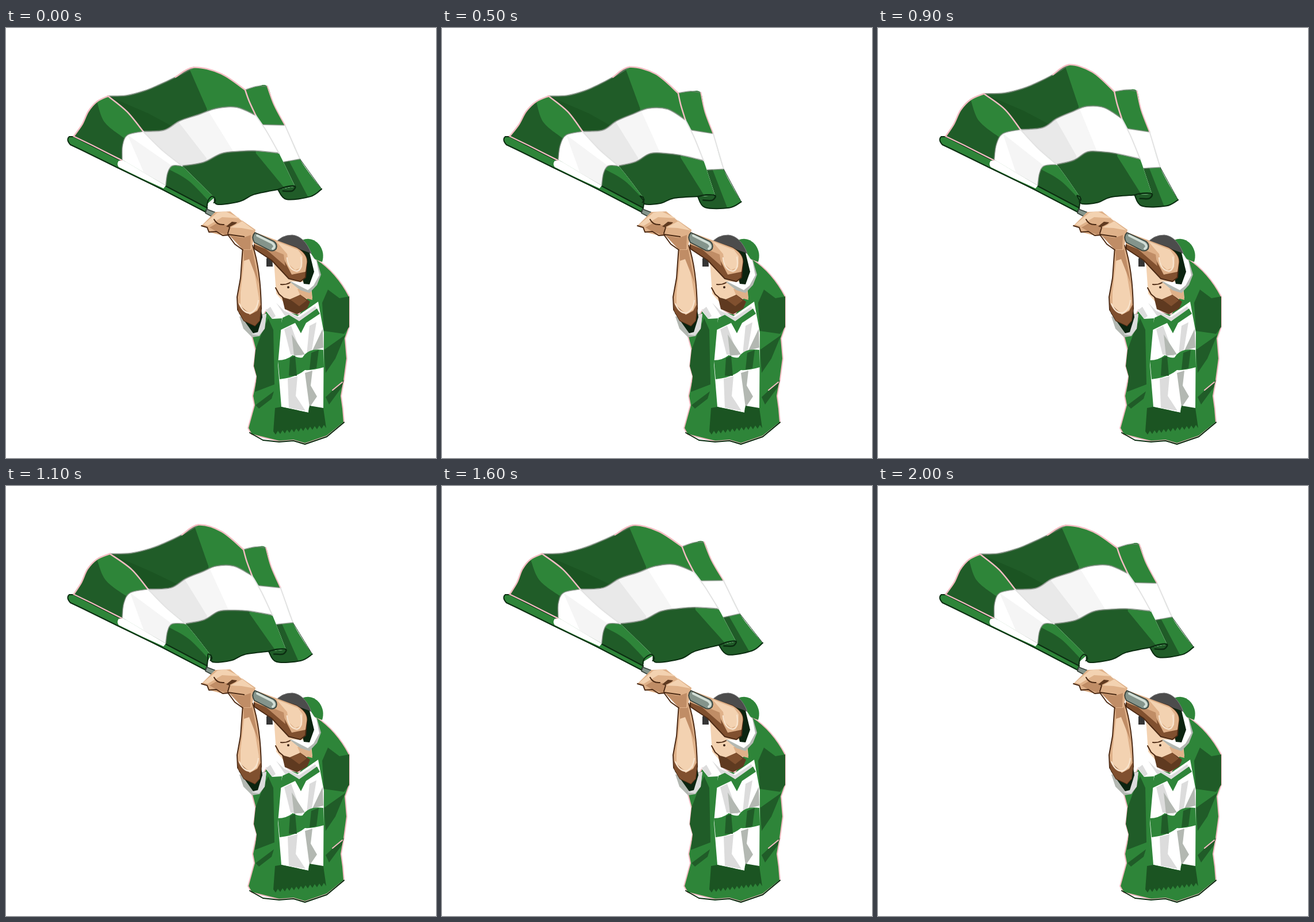
Animation of 748 by 748 pixels, one loop 2.1 s. Source, as an HTML page with a canvas:

```html
<!DOCTYPE html>
<html lang="en">
<head>
<meta charset="utf-8">
<title>Flag waver</title>
<style>
  html, body { margin: 0; width: 100%; height: 100%; overflow: hidden; background: #fff; }
  canvas, svg { position: absolute; left: 0; top: 0; width: 748px; height: 748px; display: block; }
  path { stroke-linecap: round; stroke-linejoin: round; }
  .green { fill: #2e8539; }
  .dark { fill: #205c28; }
  .deep { fill: #1b5422; }
  .ink { fill: #0b2410; }
  .white { fill: #fff; }
  .pale { fill: #dcdcdc; }
  .grey { fill: #b3b8b2; }
  .skin { fill: #dfb189; }
  .light { fill: #f3d2b1; }
  .tan { fill: #c08d66; }
  .brown { fill: #80502f; }
  .bark { fill: #5f3a20; }
  .metal { fill: #84948b; stroke: #39443d; stroke-width: 1.8; }
  .line { fill: none; }
  .pink { stroke: #f3bcc2; stroke-width: 2; }
  .edge { stroke: #4c2a14; stroke-width: 2; }
  .rim { stroke: #0b2d11; stroke-width: 2; }
  .glow { stroke: #f8e3cc; stroke-width: 2.5; }
</style>
</head>
<body>
<canvas id="flag" width="748" height="748"></canvas>
<svg viewBox="0 0 748 748">
  <!-- pole sleeve -->
  <path class="green rim" d="M118 189L201 231 278 275 350 313 347 320 272 281 194 243 131 212 112 203Q104 194 110 189Z"/>
  <path class="white" d="M196 231L203 230 278 274 274 279 235 261 196 242Q192 237 196 231Z"/>
  <path class="line pink" d="M117 188L150 204 201 230"/>

  <!-- shirt -->
  <path class="green pink" d="M428 537L434 560 431 588 436 606 429 640 432 656 421 696 427 707 475 719 500 717 520 723 558 710 588 686 586 662 583 640 588 612 593 575 590 540 597 520 597 467Q575 425 540 402L528 460 510 498 476 490 453 490Z"/>
  <path class="dark" d="M445 530L456 505 465 525 467 620 433 633 436 606 431 588 434 560ZM550 478L560 455 580 470 597 467 597 520 588 532 553 527ZM553 560L590 534 573 575 556 600ZM556 642L588 612 584 625 562 655ZM434 656L466 632 462 645 440 662Z"/>
  <path class="line pink" d="M568 630L585 616"/>
  <path class="line rim" d="M424 704L447 717 475 720 500 718 520 724 558 711 588 686"/>

  <!-- scarf -->
  <path class="white" d="M451 491L475 474 484 490 507 501 543 476 553 530 552 662 527 660 526 669 479 659 473 585 480 505 463 506Z"/>
  <path class="pale" d="M452 491L460 485 469 501 463 506ZM470 478L484 492 510 503 538 484 541 491 512 510 486 502Z"/>
  <path class="green" d="M481 504L492 499 510 510 541 488 546 497 522 513 513 531 503 513 476 526Z"/>
  <path class="pale" d="M484 524L496 518 515 570 495 568ZM528 518L540 512 532 560 523 568ZM490 610L507 606 504 640 521 666 492 661Z"/>
  <path class="grey" d="M497 533L520 568 501 570ZM551 523L552 556 533 561ZM520 600L533 596 530 622 541 641 528 660Z"/>
  <path class="green" d="M473 578Q488 578 499 569 508 575 516 573 526 556 552 560L553 590Q533 596 520 595 505 608 476 611Z"/>
  <path class="dark" d="M494 574L503 570 506 605 492 605ZM531 565L544 560 540 592 528 594Z"/>
  <path id="fringe" class="deep"/>

  <!-- head -->
  <path class="green" d="M515 369Q532 362 545 377 555 391 550 407L537 402Z"/>
  <path class="light" d="M466 405L500 410 530 440 533 470 482 476 470 462Z"/>
  <path class="skin" d="M507 454L530 450 533 473 513 468Z"/>
  <path class="bark" d="M480 468L494 472 512 464 529 476 524 488 506 498 485 489Z"/>
  <path class="brown" d="M494 472L512 464 523 474 510 484Z"/>
  <path class="line edge" d="M478 446Q487 447 494 443M469 452L475 463 482 469"/>
  <circle cx="491" cy="451" r="2" fill="#3b2413"/>
  <path fill="#353535" d="M453 401L463 392 464 415 453 415Z"/>
  <path fill="#4c4c4c" stroke="#7d7d7d" d="M467 376Q478 360 498 360 519 362 531 392L505 388Z"/>

  <!-- raised arm -->
  <path class="grey" d="M526 392L541 405 548 429 541 447 528 461 512 456 493 441 522 442Z"/>
  <path class="white" d="M526 392L540 405 545 430 535 448 525 456 496 441 522 442Z"/>
  <path class="ink" d="M503 382L528 391 536 424 528 446 518 445Z"/>
  <path class="brown edge" d="M432 356L470 371 505 382Q526 394 523 410L521 434 512 441 492 436 462 404 432 384Z"/>
  <path class="skin" d="M432 355L470 369 505 382Q526 394 523 410L521 424 497 429 480 396 431 376Z"/>
  <path class="tan" d="M444 378L483 394 486 414 456 388Z"/>
  <path class="light" d="M470 371L508 386 516 397 515 416 503 421 492 411 489 393Z"/>
  <path class="line glow" d="M489 400Q491 421 506 423 517 420 513 399"/>

  <!-- lower arm and cuff -->
  <path class="grey" d="M406 502L413 523 428 538 441 536 450 523 453 497Z"/>
  <path class="pale" d="M445 500L453 497 450 523 440 535 428 533Z"/>
  <path class="ink" d="M405 496L430 531 438 529 446 503 444 490Z"/>
  <path class="skin edge" d="M412 380L429 378Q443 420 444 488L441 509 433 518 414 509 403 490 402 468 408 435Z"/>
  <path class="light" d="M416 388L426 390 440 470 437 490 424 496 408 484 408 460Z"/>
  <path class="tan" d="M413 384L428 384 440 445 423 402 414 405Z"/>
  <path class="brown" d="M403 478L424 499 437 492 444 479 441 509 433 518 414 509 404 492Z"/>
  <path class="line glow" d="M406 480Q413 496 425 496 437 491 439 474"/>

  <!-- pole and hands -->
  <path class="metal" d="M349 315L370 323 366 332 347 322Z"/>
  <path class="skin" d="M340 344L364 320 390 319 411 336 390 360 377 361 353 355 350 346Z"/>
  <path class="light" d="M343 342L368 321 382 319 407 331 376 329 351 344Z"/>
  <path class="tan" d="M354 347L366 340 384 343 390 353 386 361 366 354Z"/>
  <path class="bark" d="M383 345L393 337 402 338 392 349Z"/>
  <path class="line edge" d="M340 344L350 347 353 355 366 354 377 361 389 360M362 333Q367 343 379 342"/>
  <path class="skin" d="M386 358L389 346 411 335 434 351 427 386 412 386Z"/>
  <path class="light" d="M391 347L411 336 432 352 410 348Z"/>
  <path class="tan" d="M389 361L412 365 426 360 425 385 412 385Z"/>
  <path class="line edge" d="M386 359L414 363M387 361L398 376 412 386M389 347L386 357"/>
  <path class="metal" d="M433 356L466 371Q473 376 470 384 466 389 459 387L432 373Q426 363 433 356Z"/>
  <path class="line" stroke="#d3dfd7" stroke-width="4" d="M437 361L463 374Q470 380 464 384"/>
</svg>

<script>
const LOOP = 2100, STEP = 100, SWING = 2000;
const GREEN = '#2e8539', DARK = '#205c28', DEEP = '#1b5422', PINK = '#f3bcc2',
      GREY = 'rgba(120,130,120,.6)', FAINT = '#e3e3e3', RIM = '#0b2d11';

// The cloth at rest; the wind formula moves every point.
const cloth = {
  left: '118,188 132,167 143,143 159,125',
  fold: '180,115 215,142 243,177 274,209 309,238 358,294',
  top: '214,114 246,106 271,96 300,82 330,65 374,77',
  ridge: '414,108 420,128 430,153 447,181 467,221 492,280',
  upper: '281,174 307,158 337,147 365,137 398,137',
  lower: '343,231 371,216 400,214 427,215',
  hem: '362,306 397,302 420,291 462,284',
  edge: '435,103 453,104 463,137 480,173 503,233 538,287',
  under: '518,299 476,302',
  shade: '324,70 350,137 390,214 306,161 348,223 427,219 473,281',
  bend: '204,203 214,184'
};
for (const k in cloth) cloth[k] = cloth[k].split(' ').map(s => s.split(',').map(Number));

const ctx = document.getElementById('flag').getContext('2d');
ctx.lineCap = ctx.lineJoin = 'round';

const clamp = v => Math.min(1, Math.max(0, v));
const ease = v => v * v * (3 - 2 * v);
const mix = (a, b, k) => [a[0] + (b[0] - a[0]) * k, a[1] + (b[1] - a[1]) * k];
const shift = (p, x, y) => [p[0] + x, p[1] + y];
const rev = a => [...a].reverse();

// The free end swings about the crest, folds sway along the cloth, and a quick
// flutter lifts whatever lies away from the pole.
function wind([x, y], t) {
  const turn = 2 * Math.PI * t / SWING;
  const lift = clamp((.49 * (x - 118) - .87 * (y - 188)) / 90);
  const far = ease(clamp((x - 300) / 130));
  const swing = .095 * far * Math.cos(turn - 2.14);
  const sway = 6 * lift * (1 - far) * Math.cos(turn - x / 75 + .4);
  const flutter = lift * (4 - 2 * far) * Math.cos(4 * turn - .5);
  return [x - swing * (y - 70) + sway, y + swing * (x - 369) + flutter];
}

function poseAt(t) {
  const pose = {};
  for (const k in cloth) pose[k] = cloth[k].map(p => wind(p, t));
  return pose;
}

// Smooth curve through all points.
function trace(path, pts, join) {
  path[join ? 'lineTo' : 'moveTo'](...pts[0]);
  for (let i = 0; i < pts.length - 1; i++) {
    const p = pts[i], q = pts[i + 1], o = pts[i - 1] || p, r = pts[i + 2] || q;
    path.bezierCurveTo(p[0] + (q[0] - o[0]) / 6, p[1] + (q[1] - o[1]) / 6,
                       q[0] - (r[0] - p[0]) / 6, q[1] - (r[1] - p[1]) / 6, ...q);
  }
}

function shape(...parts) {
  const path = new Path2D();
  parts.forEach((pts, i) => trace(path, pts, i > 0));
  path.closePath();
  return path;
}

function poly(...pts) {
  return shape(...pts.map(p => [p]));
}

function leftOf(...pts) {
  const a = pts[0], b = pts.at(-1);
  return shape([[0, a[1] - 40]], [shift(a, 0, -40)], pts, [shift(b, 0, 40)], [[0, b[1] + 40]]);
}

// Everything under a band line.
function below(line) {
  const a = line[0], b = line.at(-1);
  return shape(line, [[700, b[1]]], [[700, 600]], [[a[0] - 80, 600]], [[a[0] - 80, a[1]]]);
}

function fill(path, color) {
  ctx.fillStyle = color;
  ctx.fill(path);
}

function stroke(pts, color, width = 2) {
  const path = new Path2D();
  trace(path, pts);
  ctx.strokeStyle = color;
  ctx.lineWidth = width;
  ctx.stroke(path);
}

function within(path, color, paint) {
  ctx.save();
  ctx.clip(path);
  fill(path, color);
  paint();
  ctx.restore();
}

function drawFarPanel({ ridge: R, edge: free, under: foot, hem }) {
  const edge = [R[0], ...free], E1 = edge[4], E2 = edge[5];
  const curl = hem[3], under = [edge[6], ...foot, curl];
  const P1 = mix(R[2], R[3], .6), P2 = mix(R[4], R[5], .27);

  within(shape(edge, under, rev(R)), GREEN, () => {
    fill(poly(shift(P1, -30, 0), P1, E1, shift(E1, 30, 0), shift(E2, 30, 0), E2, P2, shift(P2, -30, 0)), '#fff');
    fill(poly(P2, mix(P2, E2, .35), shift(foot[0], 0, 9), shift(curl, -20, 30), curl, R[5]), DARK);
  });
  stroke([P1, E1], GREY);
  stroke([P2, E2], GREY);
  stroke(edge.slice(0, 3), GREY);
  stroke(edge.slice(2, 5), PINK);
  stroke(edge.slice(4, 6), FAINT);
  stroke(edge.slice(5), RIM, 1);
  stroke(under, RIM);
}

function drawMiddlePanel(p) {
  const F = p.fold, R = p.ridge, S = p.shade, curl = p.hem[3];
  const top = [F[0], ...p.top, R[0]], hem = [F[5], ...p.hem, R[5]];
  const band1 = [F[2], ...p.upper, R[2]], band2 = [F[4], ...p.lower, R[4]];

  within(shape(top, R, rev(hem), rev(F)), GREEN, () => {
    fill(leftOf(S[0], S[1]), DARK);
    fill(poly(F[0], shift(F[0], 70, 30), shift(F[2], 52, -8), shift(F[2], 30, 12), F[2]), DEEP);
    within(below(band1), '#fff', () => {
      fill(leftOf(S[1], S[2]), '#f6f6f6');
      fill(leftOf(S[3], S[4]), '#e9e9e9');
    });
    within(below(band2), GREEN, () => fill(leftOf(S[5], S[6]), DARK));
  });
  stroke(band1, GREY, 2.5);
  stroke(band2, GREY, 2.5);
  stroke(hem.slice(0, 5), RIM);
  stroke(top.slice(0, 6), GREY, 2.5);
  stroke(top.slice(4), PINK, 2.5);
  stroke(R.slice(0, 3), PINK, 2.5);
  stroke(R.slice(2, 5), FAINT);
  stroke([curl, mix(curl, shift(R[5], 0, -4), .5), R[5], shift(R[5], -5, 8), shift(R[5], -21, 8)], RIM, 2.5);
}

function drawNearPanel({ fold: F, left: rise, bend }) {
  const left = [...rise, F[0]], start = [202, 229], end = [278, 274], knee = [289, 240];
  const band1 = [start, ...bend, F[2]], band2 = [end, [281, 253], knee, F[4]];
  const low = mix(...bend, .6);

  within(shape(left, F, [[351, 305]], [[349, 318]], [end], [start]), GREEN, () => {
    fill(leftOf(left[3], shift(mix(left[3], low, .5), -11, 4), low), DARK);
    within(below(band1), '#fff', () => {
      fill(poly(bend[1], mix(bend[1], knee, .5), knee, end, [240, 252]), '#f5f5f5');
    });
    within(below(band2), GREEN, () => fill(leftOf([284, 246], [318, 266], [352, 300]), DARK));
  });
  stroke(band1, GREY);
  stroke(band2, GREY);
  stroke(left, PINK, 2.5);
  stroke(F.slice(0, 3), PINK, 2.5);
  stroke(F.slice(2, 5), FAINT);
  stroke([F[5], shift(F[5], -5, -2), [351, 302], [349, 318]], RIM);
  stroke([F[5], shift(F[5], 2, 5), shift(F[5], -1, 9)], RIM);
}

function drawFringe() {
  let d = 'M468 661L479 659L526 669L528 657L552 661L557 696';
  for (let x = 557, up = 0; x > 462; x -= 4, up = 1 - up) d += `L${x} ${708 - (x - 464) * .13 - 6 * up}`;
  document.getElementById('fringe').setAttribute('d', d + 'Z');
}

let shown = -1;
function frame() {
  const t = Math.floor(performance.now() % LOOP / STEP) * STEP;
  if (t !== shown) {
    const pose = poseAt(t);
    ctx.clearRect(0, 0, 748, 748);
    drawFarPanel(pose);
    drawMiddlePanel(pose);
    drawNearPanel(pose);
    shown = t;
  }
  requestAnimationFrame(frame);
}
drawFringe();
frame();
</script>
</body>
</html>
```
